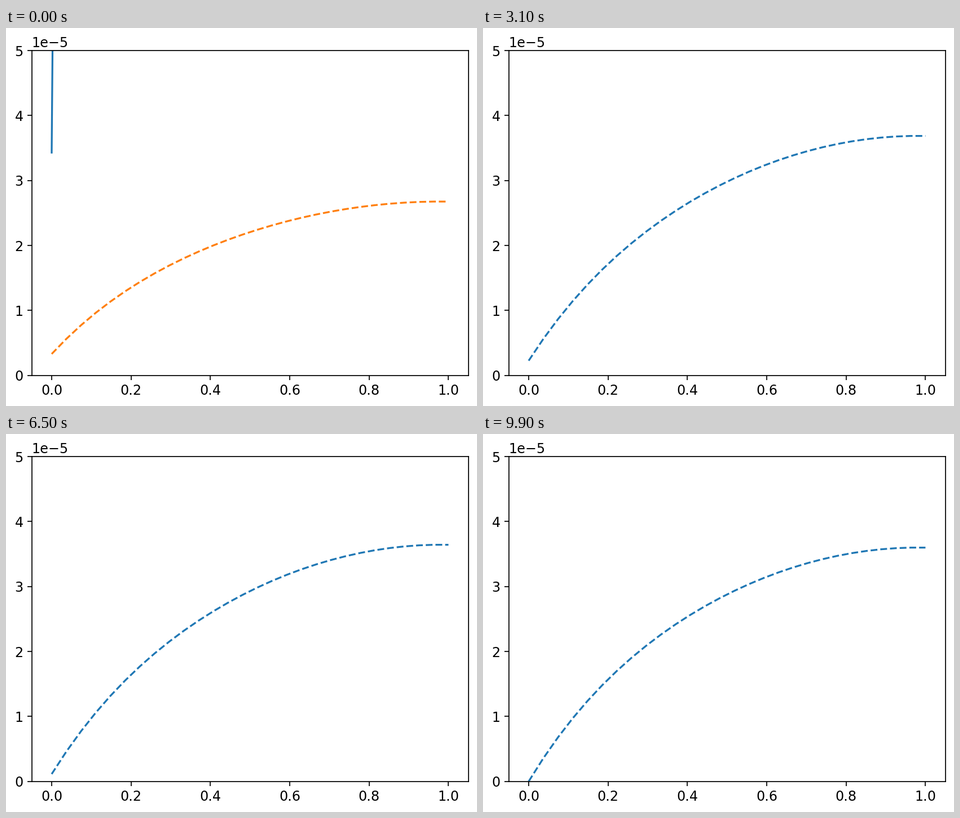
A matplotlib script for the animation above (10000 ms loop, 835x671 px).

```python
import numpy as np
import matplotlib.pyplot as plt
from matplotlib.animation import FuncAnimation

W, H, DPI = 835, 671, 156
FRAMES, INTERVAL = 100, 100
BLUE, ORANGE = "#1f77b4", "#ff7f0e"

# Coarse grid; the crest lies midway in the last cell, so the end is flat.
x = np.linspace(0, 1, 28)
crest = 1 - x[1] / 2
s = np.abs(crest - x) / crest


def swing(k):
    """Alternating, decaying overshoot."""
    return -(-1) ** k * 0.331 * np.exp(-0.8435 * k ** 0.7)


def profile(k):
    p = k / (FRAMES - 1)
    left = 0.33 * (1 - p)
    right = (3.727 - 0.127 * p) * np.exp(swing(k))
    layer = 0.153 + 0.022 * p - 0.066 * swing(k)
    drop = (1 - layer) * s ** 2 + layer * s ** 6.4
    return 1e-5 * (right - (right - left) * drop)


plt.rcParams.update({"font.family": "DejaVu Sans", "font.size": 11,
                     "xtick.labelsize": 11, "ytick.labelsize": 11})
fig = plt.figure(figsize=((W + 0.01) / DPI, (H + 0.01) / DPI), dpi=DPI)
ax = fig.add_axes([45.8 / W, 54.3 / H, 4.96 * DPI / W, 3.696 * DPI / H])
ax.set_xlim(-0.05, 1.05)
ax.set_ylim(0, 5e-5)

start, = ax.plot([0, 0.01], [3.43e-5, 10.8e-5], color=BLUE)
curve, = ax.plot(x, profile(0), "--", color=ORANGE)


def update(k):
    start.set_visible(k == 0)
    curve.set_color(ORANGE if k == 0 else BLUE)
    curve.set_ydata(profile(k))
    return start, curve


anim = FuncAnimation(fig, update, frames=FRAMES, interval=INTERVAL,
                     repeat=True, repeat_delay=0)
plt.show()
```
